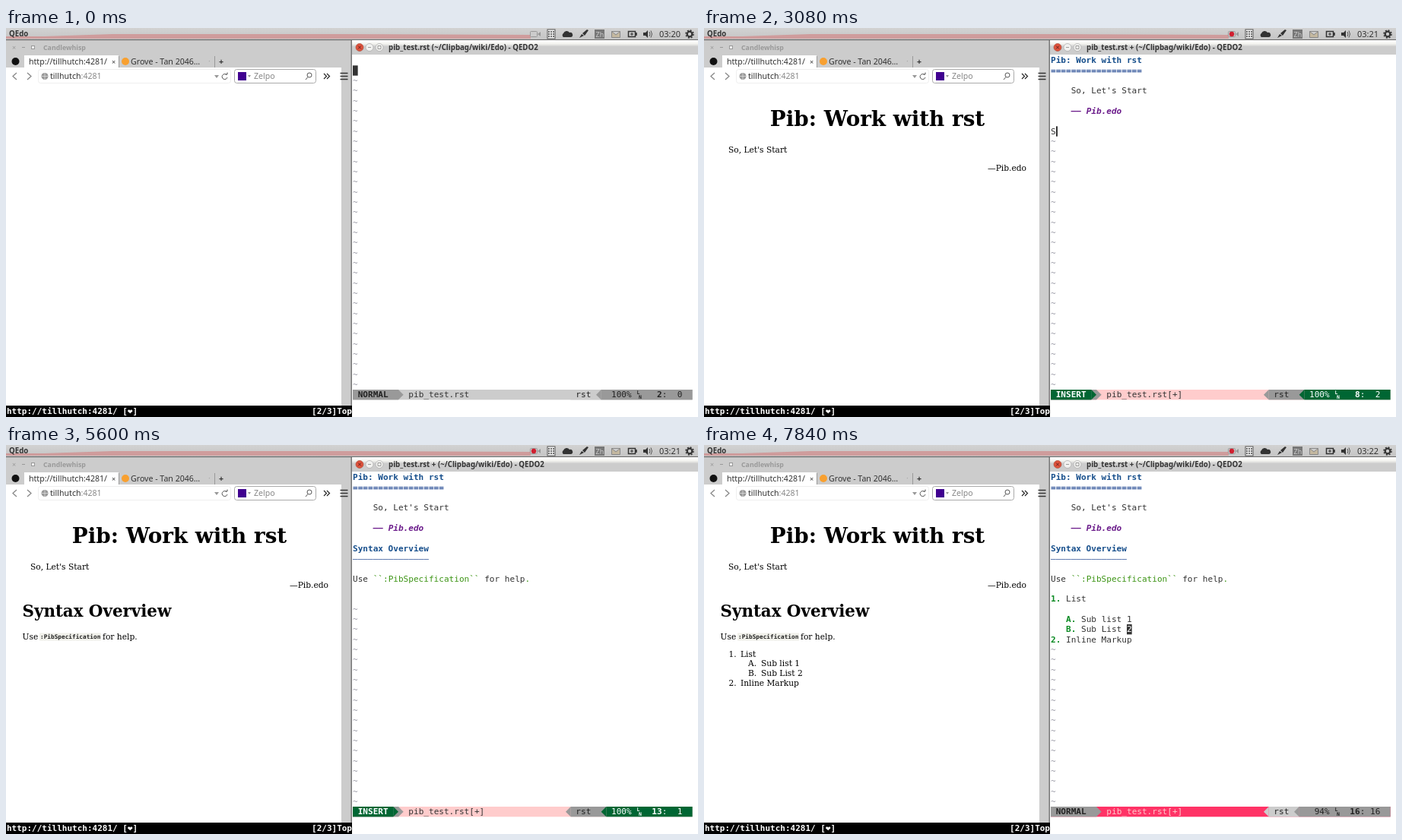
Write an HTML page that moves like this. It is 910 px wide and 512 px high and loops after 8 s.

```html
<!DOCTYPE html>
<html lang="en">
<head>
<meta charset="utf-8">
<title>Live preview</title>
<style>
html, body { margin: 0; width: 100%; height: 100%; overflow: hidden; background: #fff; }
svg { display: block; width: 910px; height: 512px; }
text { white-space: pre; }
.ui { font-family: "Noto Sans", "Open Sans", sans-serif; font-size: 10.6px; fill: #333; }
.cap { font-size: 9.7px; font-weight: bold; }
.mono { font-family: "DejaVu Sans Mono", monospace; font-size: 11.07px; fill: #333; }
.page { font-family: "DejaVu Serif", serif; font-size: 10.67px; fill: #000; }
.b { font-weight: bold; }
.h1 { font-size: 27.8px; font-weight: bold; }
.h2 { font-size: 21.4px; font-weight: bold; }
.code { font: bold 7.75px "DejaVu Sans Mono", monospace; fill: #222; }
.line { fill: none; stroke: #555; }
</style>
</head>
<body>
<svg viewBox="0 0 910 512">
  <defs>
    <linearGradient id="bar" x2="0" y2="1">
      <stop offset="0" stop-color="#d2d2d2"/><stop offset="1" stop-color="#c4c4c4"/>
    </linearGradient>
    <linearGradient id="cap" x2="0" y2="1">
      <stop offset="0" stop-color="#fff"/><stop offset=".25" stop-color="#f4f4f0"/>
      <stop offset=".45" stop-color="#ccc"/><stop offset="1" stop-color="#ccc"/>
    </linearGradient>
  </defs>

  <!-- desktop panel -->
  <rect width="910" height="16" fill="url(#bar)"/>
  <path d="M0 11H50L140 8H430L690 9V14H0Z" fill="#cf9c9c"/>
  <rect y="15" width="910" height="1.5" fill="#666"/>
  <text class="ui cap" x="4" y="11">QEdo</text>
  <g id="tray"></g>

  <!-- browser window -->
  <rect y="16.500" width="455" height="58" fill="#ccc"/>
  <g class="ui" style="fill:#999">
    <text x="8" y="29" font-size="9">×</text><path d="M21 25.500h4" stroke="#999"/>
    <rect x="33.500" y="23.500" width="4" height="4" fill="#eee" stroke="#999"/>
    <text class="cap" x="49" y="29" style="font-size:8.8px">Candlewhisp</text>
  </g>
  <rect x="24" y="36" width="124" height="17" fill="#fff"/>
  <path d="M148.500 37V52M274.500 37V52" stroke="#999"/>
  <circle cx="12.500" cy="44" r="5" fill="#111"/>
  <circle cx="157" cy="44" r="5" fill="#f8a030"/>
  <g class="ui">
    <text x="30" y="48">http://tillhutch:4281/</text><text x="139" y="48" font-size="9">×</text>
    <text x="164" y="48">Grove - Tan 2046…</text><text x="266" y="47" fill="#aaa">·</text>
    <text x="280" y="48" class="b">+</text>
  </g>
  <rect y="52" width="441" height="445" fill="#fff"/>
  <rect x="441" y="52" width="13" height="445" fill="#ccc"/>
  <rect x="453.500" y="16" width="1.500" height="481" fill="#777"/>
  <path class="line" d="M14 59L9 63.500L14 68M28 59L33 63.500L28 68" style="stroke:#888;stroke-width:1.300"/>
  <rect x="42.500" y="54.500" width="253" height="18" rx="3" fill="none" stroke="#eee"/>
  <circle cx="51" cy="63.500" r="4.500" fill="#999"/>
  <path d="M47 63.500h8M51 59v9" stroke="#ddd" stroke-width=".8"/>
  <text class="ui" x="58" y="67">tillhutch<tspan fill="#888">:4281</tspan></text>
  <path class="line" d="M290 61.500A3.500 3.500 0 1 0 291 65M288.500 61h2.500v-2.500"/>
  <rect x="300.500" y="54.500" width="107" height="18" rx="3" fill="#fff" stroke="#aaa"/>
  <path d="M274 62h6l-3 4zM318 62h4l-2 3z" fill="#999"/>
  <rect x="305" y="58" width="11" height="11" fill="#400090"/>
  <text class="ui" x="326" y="67" style="fill:#888">Zelpo</text>
  <circle class="line" cx="399" cy="62" r="3"/><path class="line" d="M397 64.500L394 68"/>
  <path class="line" d="M418 60l3.500 3.500L418 67M422 60l3.500 3.500L422 67" style="stroke:#222;stroke-width:1.200"/>
  <path d="M439.500 59.500h10M439.500 63.500h10M439.500 67.500h10" stroke="#333" stroke-width="1.500"/>
  <g class="page" id="page"></g>
  <rect y="497" width="455" height="15" fill="#000"/>
  <g class="mono b" style="fill:#fff;font-size:11px">
    <text x="1" y="508">http://tillhutch:4281/ [❤&#xFE0E;]</text>
    <text x="455" y="508" text-anchor="end">[2/3]Top</text>
  </g>

  <!-- editor window -->
  <rect x="455" y="16" width="455" height="19" fill="url(#cap)"/>
  <circle cx="465" cy="25.500" r="5" fill="#e0533c" stroke="#a04030" stroke-width=".6"/>
  <path d="M463 23.500l4 4M467 23.500l-4 4" stroke="#622"/>
  <g fill="#f2f2f0" stroke="#aaa" stroke-width=".7">
    <circle cx="478" cy="25.500" r="5"/><circle cx="491" cy="25.500" r="5"/>
    <path d="M476 25.500h4M489 23.500h4v4h-4z" stroke="#777"/>
  </g>
  <g id="caption"></g>
  <g class="mono" id="editor"></g>
</svg>
<script>
const STEP = 280, LOOP = 8000, CW = 20 / 3, LH = 40 / 3, X0 = 456, Y0 = 36, ROWS = 33;
const $ = id => document.getElementById(id);
const colX = c => X0 + c * CW;
const rowY = r => Y0 + r * LH;

const DOC = ['Pib: Work with rst', '='.repeat(18), '', "    So, Let's Start", '',
  '    -- Pib.edo', '', 'Syntax Overview', '-'.repeat(15), '',
  'Use ``:PibSpecification`` for help.', '', '1. List', '', '   A. Sub list 1'];
const LIST_END = '   B. Sub List 2\n';

// mode, finished lines, text being typed, preview blocks, preview draft, extras
const STEPS = [
  ['N', 0, '\n', 0, '', { row: 2, col: 0, clean: 1 }],
  ['I', 0, '', 0, '', { total: 2 }],
  ['I', 0, 'Pi', 0, '', { total: 2 }],
  ['I', 0, 'Pib:', 0, 'Pi', { total: 2 }],
  ['I', 0, 'Pib: Wo', 0, 'Pib:', { total: 2 }],
  ['I', 0, 'Pib: Work', 0, 'Pib: Wo', { total: 2, menu: ['Work', 'Working', 'Works'], msg: 'Back at original' }],
  ['I', 0, 'Pib: Work with', 0, 'Pib: Work', { total: 2 }],
  ['I', 0, 'Pib: Work with rst', 0, 'Pib: Work with', { total: 2 }],
  ['I', 2, '\n    So, ', 1, ''],
  ['I', 2, "\n    So, Let's Start", 1, 'So, Le'],
  ['I', 4, '\n    -- Pib.e', 2, ''],
  ['I', 7, 'S', 3, ''],
  ['I', 7, 'Syntax', 3, 'S'],
  ['I', 7, 'Syntax Overv', 3, 'Syntax'],
  ['I', 9, '', 3, 'Syntax Overview'],
  ['I', 9, '\n', 4, '', { hide: 1, msg: '1 line less' }],
  ['I', 10, 'Use ', 4, ''],
  ['I', 10, 'Use ``:Pib', 4, 'Use', { total: 12 }],
  ['I', 10, 'Use ``:PibSpecification``', 4, 'Use ``:Pib', { total: 12 }],
  ['I', 10, 'Use ``:PibSpecification`` for he', 4, 'Use :PibSpecification', { total: 12 }],
  ['I', 11, '\n', 5, '', { hide: 1 }],
  ['I', 12, '1. ', 5, ''],
  ['I', 12, '1. List', 5, ''],
  ['I', 13, '\n   A. Sub li', 6, ''],
  ['I', 15, '\n   B. Sub Li', 7, ''],
  ['N', 15, '\n' + LIST_END + '   C.', 7, 'B. Sub List 2 C.'],
  ['I', 15, '\n' + LIST_END + '2. Inl', 8, ''],
  ['N', 15, '\n' + LIST_END + '2. Inline Markup', 9, ''],
  ['N', 15, LIST_END + '2. Inline Markup', 9, '', { row: 16, col: 16 }]
];

const text = (x, y, s, cls = '', more = '') => `<text x="${x}" y="${y}" class="${cls}" ${more}>${s}</text>`;
const rect = (x, y, w, h, fill) => `<rect x="${x}" y="${y}" width="${w}" height="${h}" fill="${fill}"/>`;
const cells = (c, r, n, fill) => rect(colX(c), rowY(r), n * CW, LH, fill);
const put = (c, r, s, fill = '#333', cls = '', more = '') =>
  text(colX(c), rowY(r) + 10.4, s, cls, `style="fill:${fill}" ${more}`);

function drawTray(step) {
  const clock = step < 9 ? '03:20' : step < 27 ? '03:21' : '03:22';
  const shade = 'fill="#333"';
  $('tray').innerHTML =
    '<rect x="689.5" y="4.5" width="9" height="7" rx="1" fill="#ccc" stroke="#999"/><path d="M699 8l4-3v6z" fill="#999"/>' +
    (step ? '<circle cx="694" cy="8" r="3.2" fill="#d02030"/>' : '') +
    '<rect x="712" y="2" width="10" height="12" fill="#f4f4f4" stroke="#555"/><path d="M713 5h8M713 8h8M713 11h8" stroke="#444" stroke-dasharray="2 1" stroke-width="1.5"/>' +
    `<path d="M733 12a3 3 0 0 1 0-5a4.500 4.500 0 0 1 8-1a3 3 0 0 1 2 6z" ${shade}/>` +
    `<path d="M754 13l3-5 3 2zM758 7l6-5 2 1-5 7z" ${shade}/>` +
    rect(774, 2, 13, 12, '#777') + text(775.5, 11.5, 'Zh', 'ui', 'style="fill:#ccc;font-size:9px"') +
    '<path d="M796.500 4.500h11v8h-11zl5.500 4.500 5.500-4.500" fill="#c4b8a0" stroke="#888"/>' +
    '<path d="M818.500 4.500h9v7h-9zM829 6v4" fill="none" stroke="#333" stroke-width="1.500"/><path d="M821 8h4M823 6v4" stroke="#333"/>' +
    `<path d="M838 6h3l3-3v10l-3-3h-3z" ${shade}/><path class="line" d="M846 5q2 3 0 6M848 3.500q3 4.500 0 9"/>` +
    text(859, 12, clock, 'ui', 'style="font-size:11px"') +
    '<circle cx="899" cy="8" r="3.300" fill="none" stroke="#333" stroke-width="2.200"/>' +
    '<circle cx="899" cy="8" r="5" fill="none" stroke="#333" stroke-width="1.500" stroke-dasharray="2 1.930"/>';
}

function drawPage(level, draft) {
  const subY = level > 7 ? 291 : 302;
  const blocks = [
    text(228, 129, 'Pib: Work with rst', 'h1', 'text-anchor="middle"'),
    text(32, 164, "So, Let's Start"),
    text(424, 188, '—Pib.edo', '', 'text-anchor="end"'),
    text(21.5, 226, 'Syntax Overview', 'h2'),
    text(21.5, 255.5, 'Use') + rect(44, 247.5, 81, 10, '#f0f0ea') +
      text(45, 255, ':PibSpecification', 'code') + text(127, 255.5, 'for help.'),
    text(32.5, 279, '1.') + text(48, 279, 'List'),
    text(58, subY, 'A.') + text(75, subY, 'Sub list 1'),
    text(58, 304, 'B.') + text(75, 304, 'Sub List 2'),
    text(32.5, 317, '2.') + text(48, 317, 'Inline Markup')
  ];
  const next = [[21.5, 104.5], [32, 164], [32, 188], [21.5, 212], [21.5, 255.5], [32.5, 279], [58, 302], [48, 325.5]];
  const at = next[level];
  $('page').innerHTML = blocks.slice(0, level).join('') + (draft ? text(at[0], at[1], draft) : '');
}

// the editor font has hyphens as wide as a cell
const widen = s => s.replace(/-/g, '–');

function drawLine(s, r, below = '') {
  if (/^(==|--)/.test(s)) return put(0, r, widen(s), '#2a4f96', s[0] === '=' ? 'b' : '');
  if (/^(==|--)/.test(below)) return put(0, r, s, '#174f8c', 'b');
  if (/^ +--/.test(s)) return put(4, r, widen(s.trim()), '#6a1a8a', 'b', 'font-style="italic"');
  const item = s.match(/^( *)([0-9A-Z]\.)(.*)/);
  if (item) {
    const c = item[1].length;
    return put(c, r, item[2], '#0a8a22', 'b') + put(c + 2, r, item[3]);
  }
  const tint = s.replace(/``.*?(``|$)/, '<tspan fill="#3c9414">$&</tspan>').replace(/\.$/, '<tspan fill="#3c9414">.</tspan>');
  return put(0, r, /^Use/.test(s) ? tint : s);
}

const tip = (c, fill, dir) => {
  const a = colX(dir > 0 ? c : c + 1), b = a + dir * CW, y = rowY(ROWS);
  return `<path d="M${a} ${y}L${b} ${y + LH / 2}L${a} ${y + LH}z" fill="${fill}"/>`;
};

function drawStatus(insert, clean, row, col, total) {
  const r = ROWS, green = '#006633', gray = '#999', pale = '#ccc';
  const edge = insert ? green : gray, ink = insert ? '#fff' : '#222';
  const mid = insert ? '#ffcccc' : clean ? pale : '#ff3366';
  const side = insert ? gray : pale, k = insert ? 49 : 48;
  let s = cells(0, r, 67, mid) + cells(43, r, k - 42, side) + tip(42, side, -1);
  s += cells(0, r, 9, gray) + tip(9, gray, 1);
  if (insert) s += cells(0, r, 8, green) + tip(8, green, 1);
  s += cells(k + 1, r, 66 - k, edge) + tip(k, edge, -1);
  s += put(1, r, insert ? 'INSERT' : 'NORMAL', ink, 'b');
  s += put(11, r, 'pib_test.rst' + (clean ? '' : '[+]'), insert || clean ? '#333' : '#ffcccc');
  s += put(44, r, 'rst', '#222');
  s += put(51, r, (Math.round(row / total * 100) + '%').padStart(4), ink);
  s += `<g style="font-size:6.5px;font-weight:bold">${text(829.5, 482, 'L', '', `fill="${ink}"`)}${text(832, 488, 'N', '', `fill="${ink}"`)}</g>`;
  s += put(59, r, String(row).padStart(2), ink, 'b') + put(61, r, ':', ink);
  return s + put(63, r, String(col).padStart(2), ink);
}

function drawEditor([mode, done, typed, , , opt = {}]) {
  const lines = DOC.slice(0, done).concat(typed.split('\n'));
  const insert = mode === 'I', total = opt.total || lines.length;
  const row = opt.row || lines.length;
  const col = opt.col ?? lines[row - 1].length + 1;
  let s = lines.map((l, i) => l && drawLine(l, i, lines[i + 1])).join('');
  for (let r = total; r < ROWS; r++) s += put(0, r, '~', '#9a9aa6');

  const c = Math.max(col - 1, 0), r = row - 1;
  if (insert && !opt.hide) s += rect(colX(c) + 0.5, rowY(r), 1.6, LH, '#000');
  if (!insert) s += cells(c, r, 1, '#333') + put(c, r, lines[r][c] || '', '#fff');

  if (opt.menu) {
    s += rect(colX(4), rowY(1), 16 * CW, 3 * LH, '#ccc');
    opt.menu.forEach((w, i) => s += put(5, i + 1, w.padEnd(8) + '[B]', '#999'));
  }
  s += drawStatus(insert, opt.clean, row, col, total);
  if (opt.msg) {
    const loud = !!opt.menu;
    if (loud) s += cells(0, 34, opt.msg.length, '#336600');
    s += put(0, 34, opt.msg, loud ? '#fff' : '#333', loud ? 'b' : '');
  }
  $('editor').innerHTML = s;
  $('caption').innerHTML = text(503, 29, `pib_test.rst ${opt.clean ? '' : '+ '}(~/Clipbag/wiki/Edo) - QEDO2`, 'ui cap');
}

let shown = -1;
function tick() {
  const step = Math.floor(performance.now() % LOOP / STEP);
  if (step !== shown) {
    shown = step;
    const state = STEPS[step];
    drawTray(step);
    drawPage(state[3], state[4]);
    drawEditor(state);
  }
  requestAnimationFrame(tick);
}
tick();
</script>
</body>
</html>
```
